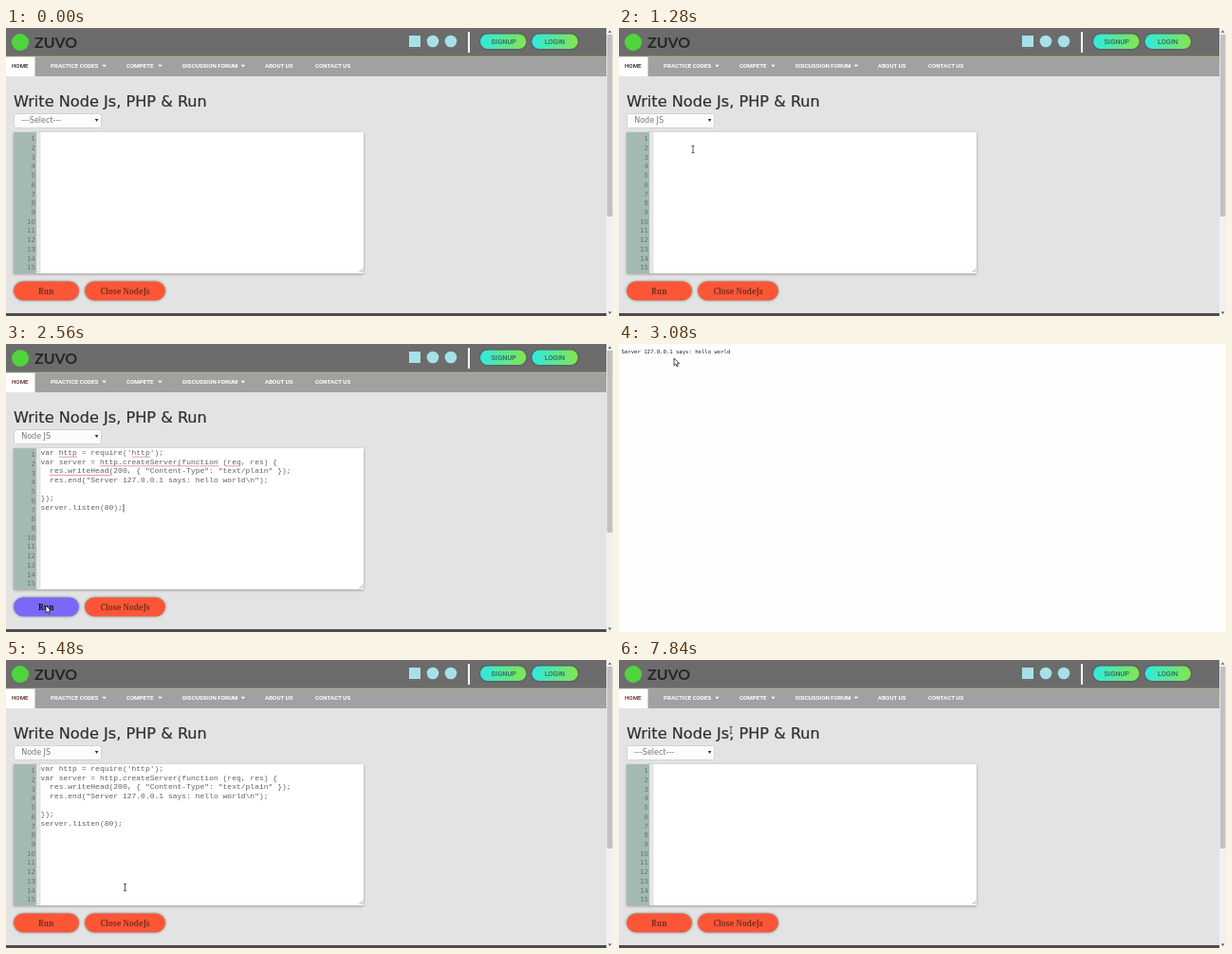
An HTML page for the animation above (8 s loop, 640 by 304 pixels).

```html
<!DOCTYPE html>
<html lang="en">
<head>
<meta charset="utf-8">
<title>Write and run</title>
<style>
  html, body { margin: 0; width: 100%; height: 100%; overflow: hidden; background: #fff; }
  svg { display: block; width: 640px; height: 304px; }
  text { white-space: pre; }
  .nav { font: 700 6.2px Roboto, sans-serif; fill: #fff; }
  .pill { font: 500 7.4px Roboto, sans-serif; fill: #2f665c; text-anchor: middle; }
  .wide { font-family: "DejaVu Sans", sans-serif; }
  .mono { font: 8px "Liberation Mono", monospace; fill: #606060; }
  .btn text { font: 700 8.1px "Noto Serif", serif; fill: #75301f; text-anchor: middle; }
  .btn rect { fill: #fc5637; filter: drop-shadow(0 .8px 1.4px #5f8a80); }
  .btn.hover rect { fill: #7b68f8; }
  .btn.hover text { fill: #111; }
  .raised { filter: drop-shadow(.8px 1.2px 1.6px #999); }
  .glow { filter: drop-shadow(0 .8px 1.2px #34433f); }
</style>
</head>
<body>
<svg viewBox="0 0 640 304">
  <defs>
    <linearGradient id="mint">
      <stop offset="0" stop-color="#2fe9e2"/>
      <stop offset="1" stop-color="#83e54d"/>
    </linearGradient>
  </defs>

  <g id="page">
    <rect width="640" height="304" fill="#e4e3e4"/>
    <rect width="633" height="30" fill="#6c6c6c"/>
    <rect y="29.5" width="633" height="1" fill="#8fa466"/>
    <rect y="30.5" width="633" height="20.5" fill="#a1a1a1"/>
    <rect y="30.5" width="30.5" height="20.5" fill="#fff"/>

    <circle cx="15" cy="15" r="9" fill="#4fd53c"/>
    <text x="30" y="20.5" font-family="Lato, sans-serif" font-weight="700" font-size="16" fill="#262626">ZUVO</text>

    <g fill="#a8e0e8">
      <rect x="425" y="8" width="12" height="12"/>
      <circle cx="450" cy="14" r="6.3"/>
      <circle cx="469" cy="14" r="6.3"/>
    </g>
    <rect x="487" y="4" width="2" height="22" fill="#fff"/>
    <g fill="url(#mint)" class="glow">
      <rect x="500" y="6.5" width="48.5" height="15.5" rx="7.75"/>
      <rect x="554.5" y="6.5" width="48.5" height="15.5" rx="7.75"/>
    </g>
    <text class="pill" x="524.8" y="16.9">SIGNUP</text>
    <text class="pill" x="578.6" y="16.9">LOGIN</text>
    <g id="nav"></g>

    <text class="wide" x="8" y="83" font-size="16.15" fill="#2c3232" stroke="#2c3232" stroke-width=".2">Write Node Js, PHP &amp; Run</text>
    <rect x="8.5" y="90.5" width="92" height="15" rx="2" fill="#fcfcfc" stroke="#d3d3d3"/>
    <text class="wide" id="choice" x="16.2" y="100.4" font-size="8" fill="#777"></text>
    <path d="M93.8 96h3.6l-1.8 3z" fill="#333"/>

    <g class="raised">
      <rect x="8" y="110" width="369" height="149" fill="#fff"/>
      <rect x="8" y="110" width="24" height="149" fill="#a5b9b3"/>
      <rect x="32" y="110" width="4.5" height="149" fill="#e3e6e5"/>
    </g>
    <path d="M372.5 258l4-4m-1.8 4l1.8-1.8" stroke="#888" stroke-width=".7"/>
    <g id="rows" class="wide" font-size="7" fill="#62756f" text-anchor="end"></g>
    <g id="script"></g>
    <g id="marks">
      <path d="M56 119.2h19M133 119.2h19M99 128.8h125M231 128.8h15M46 138.5h65" stroke="#dc7474" stroke-width=".7"/>
      <path d="M124 169v8.5" stroke="#333" stroke-width=".8"/>
    </g>

    <g class="btn" id="run">
      <rect x="8" y="267.5" width="69" height="20" rx="10"/>
      <text x="42.3" y="280.5">Run</text>
    </g>
    <g class="btn" id="close">
      <rect x="83" y="267.5" width="85" height="20" rx="10"/>
      <text x="125.7" y="280.5">Close NodeJs</text>
    </g>

    <rect y="301" width="633" height="3" fill="#4d4d4d"/>
    <rect x="633" width="7" height="304" fill="#f1f1f1"/>
    <rect x="633.7" y="7" width="5.8" height="192" fill="#c1c1c1"/>
    <path d="M634.8 4.8h3.6l-1.8-2.4zM634.8 299.5h3.6l-1.8 2.4z" fill="#555"/>
  </g>

  <g id="output">
    <rect width="640" height="304" fill="#fefefe"/>
    <text x="2.5" y="9.8" font-family="DejaVu Sans Mono, monospace" font-size="5.62" fill="#222">Server 127.0.0.1 says: hello world</text>
  </g>

  <g id="cursor">
    <path id="arrow" d="M0 0v7.8l1.8-1.6 1.3 2.7 1.2-.6-1.2-2.6h2.5z" fill="#fff" stroke="#222" stroke-width=".8"/>
    <path id="beam" d="M-1.5-3.6h3M0-3.6v7.2M-1.5 3.6h3" fill="none" stroke="#333" stroke-width=".8"/>
  </g>
</svg>

<script>
const $ = id => document.getElementById(id);
const LOOP = 8000, STEP = 40, ROW = 9.72, LINE = 9.64;

function addText(parent, x, y, str, cls = "") {
  const el = document.createElementNS("http://www.w3.org/2000/svg", "text");
  el.setAttribute("x", x);
  el.setAttribute("y", y);
  if (cls) el.setAttribute("class", cls);
  el.textContent = str;
  parent.append(el);
}

const menu = [["HOME", 6], ["PRACTICE CODES", 47, 103.5], ["COMPETE", 127, 162.5],
  ["DISCUSSION FORUM", 186, 250], ["ABOUT US", 273], ["CONTACT US", 326]];
for (const [label, x, caret] of menu) {
  addText($("nav"), x, 42.2, label, "nav");
  if (caret) $("nav").insertAdjacentHTML("beforeend",
    `<path d="M${caret - 2.2} 38.8h4.4l-2.2 2.4z" fill="#fff"/>`);
}
const home = $("nav").firstChild;

for (let i = 0; i < 15; i++) addText($("rows"), 31, 119.2 + i * ROW, i + 1);

const script = [
  "var http = require('http');",
  "var server = http.createServer(function (req, res) {",
  "  res.writeHead(200, { \"Content-Type\": \"text/plain\" });",
  "  res.end(\"Server 127.0.0.1 says: hello world\\n\");",
  "",
  "});",
  "server.listen(80);"
];
script.forEach((line, i) => addText($("script"), 36.5, 117.2 + i * LINE, line, "mono"));

// Pointer stops: time, x, y
const stops = [
  [0, 40, -12], [40, 40, -12], [440, 70, 97], [640, 70, 97], [1000, 78, 128], [1480, 78, 128],
  [1960, 106, 104], [2040, 106, 104], [2480, 42, 276], [2720, 42, 276], [3000, 58, 15],
  [3480, 58, 15], [3640, 22, 5], [3840, 22, 5], [3960, 8, -12], [4400, 8, -12],
  [5080, 125.5, 240], [5520, 125.5, 240], [6160, 126, 274], [6680, 126, 274],
  [7200, 60, -12], [7520, 100, -12], [7840, 118, 74], [8000, 118, 74]
];

function pointer(t) {
  const i = stops.findIndex(s => s[0] > t);
  const [t0, x0, y0] = stops[i - 1], [t1, x1, y1] = stops[i];
  const p = (t - t0) / (t1 - t0), e = p * p * (3 - 2 * p);
  return [x0 + (x1 - x0) * e, y0 + (y1 - y0) * e];
}

const within = (v, a, b) => v >= a && v < b;
const show = (el, on) => el.style.display = on ? "" : "none";

function draw(t) {
  const [x, y] = pointer(t);
  const away = within(t, 2720, 4360);
  const overButton = !away && within(y, 267, 288);
  const overText = !away && (within(x, 36, 377) && within(y, 110, 259) ||
    within(x, 8, 212) && within(y, 70, 86));

  show($("output"), away);
  show($("page"), !away);
  show($("script"), within(t, 1480, 7320));
  show($("marks"), within(t, 1480, 2720));
  show($("arrow"), !overText);
  show($("beam"), overText);
  $("choice").textContent = within(t, 640, 7320) ? "Node JS" : "---Select---";
  home.style.fill = t < 1480 ? "#3c3c3c" : "#763a34";
  $("run").classList.toggle("hover", overButton && within(x, 8, 77));
  $("close").classList.toggle("hover", overButton && within(x, 83, 168));
  $("cursor").setAttribute("transform", `translate(${x} ${y})`);
}

const start = performance.now();
function tick(now) {
  const t = Math.max(0, now - start) % LOOP;
  draw(Math.floor(t / STEP) * STEP);
  requestAnimationFrame(tick);
}
draw(0);
requestAnimationFrame(tick);
</script>
</body>
</html>
```
